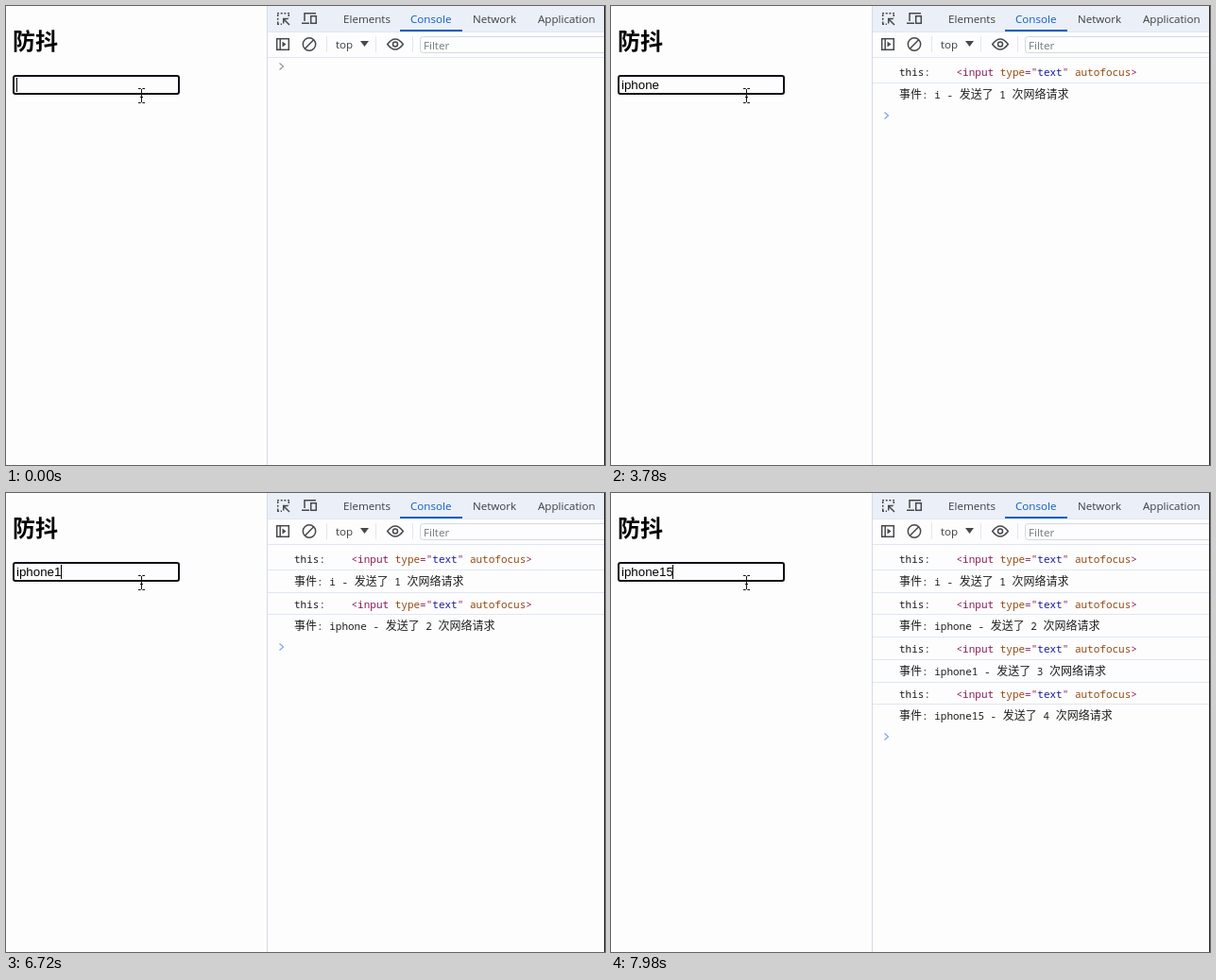
An HTML page for the animation above (8000 ms loop, 634 by 486 pixels).

```html
<!DOCTYPE html>
<html lang="zh-CN">
<head>
<meta charset="utf-8">
<title>防抖</title>
<style>
  html, body { margin: 0; width: 100%; height: 100%; overflow: hidden; background: #fdfdfd; }
  svg { display: block; width: 634px; height: 486px; }
  text { white-space: pre; }
  .title { font: bold 24px "Noto Sans CJK SC", sans-serif; }
  .field { font: 13.333px "Liberation Sans", Arial, sans-serif; }
  .ui { font: 11.6px "Open Sans", "Noto Sans", sans-serif; fill: #3c3e42; }
  .ui .active { fill: #0b5fc4; }
  .ui .hint { fill: #75777c; }
  .log { font: 11px "Noto Sans Mono", "DejaVu Sans Mono", monospace; fill: #1f1f1f; }
  .cjk { font-family: "Noto Sans CJK SC", sans-serif; font-size: 12px; }
  .tag { fill: #8a1c5c; }
  .attr { fill: #944a14; }
  .value { fill: #1a1aa6; }
  .icon { fill: none; stroke: #46484c; stroke-width: 1.5; }
  .solid { fill: #46484c; stroke: none; }
  .rule { stroke: #dfe6f4; }
</style>
</head>
<body>
<svg viewBox="0 0 634 486">
  <rect width="634" height="486" fill="#fdfdfd"/>

  <!-- Page -->
  <text class="title" x="7" y="46">防抖</text>
  <rect x="8" y="74" width="175" height="19" rx="2" fill="#fdfdfd" stroke="#101018" stroke-width="2"/>
  <text class="field" id="typed" x="11" y="88"></text>
  <rect id="caret" y="76" width="1" height="15"/>
  <path d="M140 87.5h2.5l1 1 1-1h2.5M143.5 88v14M140 102.5h2.5l1-1 1 1h2.5M142 96.5h3" fill="none" stroke="#151515"/>

  <!-- Tab bar -->
  <rect x="277" width="357" height="27" fill="#ebeff7"/>
  <path class="rule" d="M277 27.5h357M277 54.5h357"/>
  <rect x="417" y="25" width="66" height="2" fill="#0b5fc4"/>
  <g class="icon">
    <path d="M287 7.7h13M287.7 9v11M287 19.3h5M299.3 9v4" stroke-dasharray="2 1.7"/>
    <path d="M300 20l-6-6M293.7 18.5v-5h5"/>
    <path d="M316 16V7.7h12M313 18.3h8"/>
    <rect x="322.7" y="10.7" width="5.6" height="7.6"/>
  </g>
  <g class="ui">
    <text x="357" y="18">Elements</text>
    <text class="active" x="428" y="18">Console</text>
    <text x="494" y="18">Network</text>
    <text x="563" y="18">Application</text>
  </g>

  <!-- Console toolbar -->
  <g class="icon">
    <rect x="286.7" y="34.7" width="12.6" height="11.6"/>
    <path d="M290.2 35v11"/>
    <path class="solid" d="M292.5 37.5v6l4-3z"/>
    <circle cx="321" cy="40.5" r="6.7"/>
    <path d="M316.3 45.2l9.4-9.4"/>
    <path class="solid" d="M375 37h9l-4.5 6z"/>
    <path d="M403.7 40.5q8.3-11 16.6 0q-8.3 11-16.6 0z"/>
    <circle cx="412" cy="40.5" r="2.5"/>
  </g>
  <path class="rule" d="M339.5 32v17M391.5 32v17M430.5 32v17"/>
  <rect x="438.5" y="32.5" width="210" height="17" rx="3" fill="#fdfdfd" stroke="#d3d8e2"/>
  <g class="ui">
    <text x="349" y="45">top</text>
    <text class="hint" x="442" y="46">Filter</text>
  </g>

  <!-- Console output -->
  <g id="logs"></g>
  <path id="prompt" d="M289.5 -3.5l4 3.5-4 3.5" fill="none" stroke-width="1.2"/>

  <path d="M276.5 0v486" stroke="#d3dae8"/>
  <path d="M633.5 0v486" stroke="#2c2c2c"/>
</svg>

<script>
const LOOP = 8000, BLINK = 528, ROW = 23.75;
const word = "iphone15";
const keyTimes = [1820, 2050, 2240, 2430, 2660, 2800, 6720, 6850];
const requests = [
  { at: 1870, length: 1 },
  { at: 3790, length: 6 },
  { at: 6770, length: 7 },
  { at: 7850, length: 8 }
];

const byId = id => document.getElementById(id);
const typed = byId("typed"), caret = byId("caret"), logs = byId("logs"), prompt = byId("prompt");
const span = (name, text) => `<tspan class="${name}">${text}</tspan>`;

// Every row but the first has a divider above it.
function row(index, content) {
  const y = Math.round(74 + ROW * index);
  const divider = index ? `<path class="rule" d="M277 ${Math.floor(57.5 + ROW * index) + 0.5}h356"/>` : "";
  return `${divider}<text class="log" x="305" y="${y}">${content}</text>`;
}

const element = span("tag", "&lt;input ") + span("attr", "type") + span("tag", "=\"") +
  span("value", "text") + span("tag", "\" ") + span("attr", "autofocus") + span("tag", "&gt;");

logs.innerHTML = requests.map(({ length }, i) => {
  const message = span("cjk", "事件") + `: ${word.slice(0, length)} - ` +
    span("cjk", "发送了") + ` ${i + 1} ` + span("cjk", "次网络请求");
  const source = `this:<tspan x="365.5">${element}</tspan>`;
  return `<g>${row(2 * i, source)}${row(2 * i + 1, message)}</g>`;
}).join("");

function draw(t) {
  const count = keyTimes.filter(at => at <= t).length;
  typed.textContent = word.slice(0, count);
  const lastKey = count ? keyTimes[count - 1] : -20;
  const lit = Math.floor((t - lastKey) / BLINK) % 2 === 0;
  caret.setAttribute("x", Math.floor(11 + (count ? typed.getComputedTextLength() : 0)));
  caret.setAttribute("visibility", lit ? "visible" : "hidden");

  const sent = requests.filter(r => r.at <= t).length;
  [...logs.children].forEach((g, i) => g.setAttribute("visibility", i < sent ? "visible" : "hidden"));
  const y = sent ? Math.round(68.4 + 2 * ROW * sent) : 64;
  prompt.setAttribute("transform", `translate(0 ${y})`);
  prompt.setAttribute("stroke", sent ? "#7fa6e8" : "#92959c");
}

const start = performance.now();
function tick() {
  draw((performance.now() - start) % LOOP);
  requestAnimationFrame(tick);
}
tick();
</script>
</body>
</html>
```
